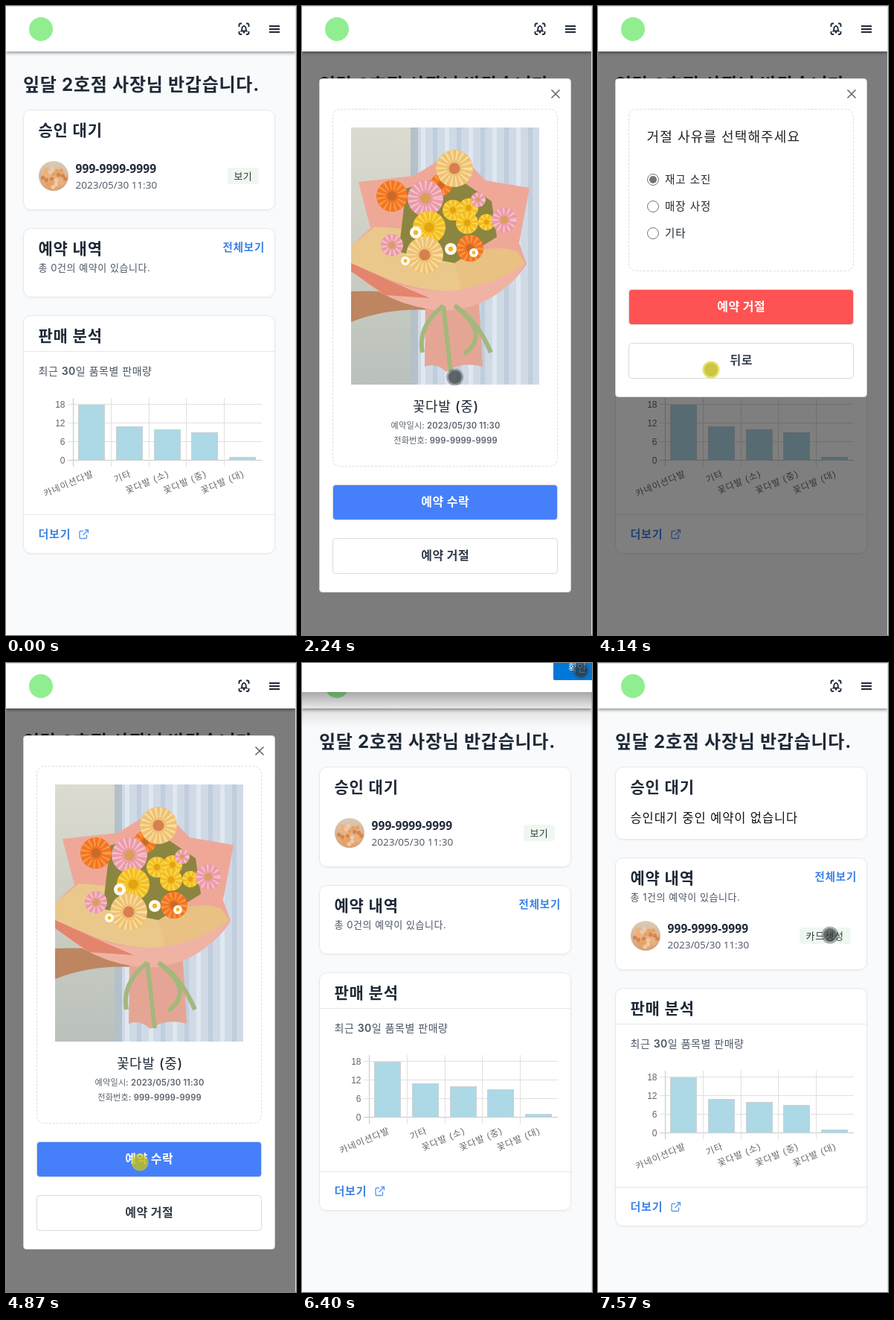
Animation of 390 by 844 pixels, one loop 8000 ms. Source, as an HTML page:

```html
<!DOCTYPE html>
<html lang="ko">
<head>
<meta charset="utf-8">
<style>
  html, body { margin: 0; width: 100%; height: 100%; overflow: hidden; background: #f9fafb; }
  svg { display: block; width: 390px; height: 844px; }
  text { font-family: Inter, 'Noto Sans CJK KR', 'Noto Sans KR', 'Noto Sans CJK JP', sans-serif; white-space: pre; }
  .open { font-family: 'Open Sans', 'Noto Sans CJK KR', sans-serif; }
  .axis { font-family: 'Liberation Sans', 'Noto Sans CJK KR', Arial, sans-serif; }
</style>
</head>
<body>
<svg id="stage" viewBox="0 0 390 844" xmlns="http://www.w3.org/2000/svg"></svg>
<script>
const LOOP = 8000;
const INK = '#1f2937', GRAY = '#4b5563', BLUE = '#3b82e8', EDGE = '#e5e7eb';
const PHONE = '999-9999-9999', DATE = '2023/05/30 11:30';

// ---- drawing helpers ----
const text = (s, x, y, size, { w = 400, fill = INK, ls = 0, more = '' } = {}) =>
  `<text x="${x}" y="${y}" font-size="${size}" font-weight="${w}" fill="${fill}" letter-spacing="${ls}" ${more}>${s}</text>`;
const rect = (x, y, w, h, fill, more = '') =>
  `<rect x="${x}" y="${y}" width="${w}" height="${h}" fill="${fill}" ${more}/>`;
const dot = (x, y, r, fill, more = '') => `<circle cx="${x}" cy="${y}" r="${r}" fill="${fill}" ${more}/>`;
const path = (d, stroke, w = 1, more = '') =>
  `<path d="${d}" fill="none" stroke="${stroke}" stroke-width="${w}" ${more}/>`;
const shape = (d, fill) => `<path d="${d}" fill="${fill}"/>`;
const group = (id, body, more = '') => `<g id="${id}" ${more}>${body}</g>`;

const card = (y, h) => rect(23.5, y + .5, 338, h - 1, '#fff', `rx="10" stroke="${EDGE}" filter="url(#soft)"`);
const heading = (s, y) => text(s, 43.5, y, 21, { w: 700, ls: .8 });
const link = (s, x, y, size) => text(s, x, y, size, { w: 600, fill: BLUE, ls: .8 });

// Round thumbnail filled with small blossoms on a spiral.
function avatar(y, id) {
  const tones = ['#f0b077', '#d98446', '#e9a05f', '#f3c9a0'];
  let s = dot(64, y, 20, 'url(#petal)');
  for (let i = 0; i < 22; i++) {
    const r = 3.5 * Math.sqrt(i), a = i * 2.4;
    s += dot((64 + r * Math.cos(a)).toFixed(1), (y + 2 + r * Math.sin(a) * .85).toFixed(1), 2.8, tones[i % 4]);
  }
  return group(id, s);
}

const booking = (y, label, x, id) => avatar(y, id) +
  text(PHONE, 93.5, y - 4, 15.5, { w: 700, ls: .1, more: 'class="open"' }) +
  text(DATE, 93.5, y + 17, 13.5, { fill: GRAY, more: 'class="open"' }) +
  rect(x, y - 11, 340 - x, 22, '#eff8f0', 'rx="4"') +
  text(label, x + 8.5, y + 4.5, 13, { fill: '#2f3b38', ls: label.length > 2 ? .9 : .3 });

const summary = (y, n) => heading('예약 내역', y + 35) + link('전체보기', 291.5, y + 31, 14.5) +
  text(`총 ${n}건의 예약이 있습니다.`, 43.5, y + 57.5, 13, { fill: GRAY, ls: .55 });

function chart() {
  const labels = ['카네이션다발', '기타', '꽃다발 (소)', '꽃다발 (중)', '꽃다발 (대)'];
  let s = '';
  for (let v = 0; v <= 18; v += 6) {
    const y = 609.5 - v * 25 / 6;
    s += path(`M83 ${y}H344`, v ? '#e0e0e0' : '#c8c8c8') +
      text(v, 79.5, y + 4, 12, { fill: '#666', more: 'class="axis" text-anchor="end"' });
  }
  [18, 11, 10, 9, 1].forEach((v, i) => {
    const x = 90.4 + i * 50.6, top = Math.round(609.5 - v * 25 / 6) + .5;
    s += path(`M${Math.round(x) + .5} 526V618`, i ? '#e0e0e0' : '#c8c8c8') +
      rect(Math.round(x + 7) + .5, top, 35, 609.5 - top, '#add8e6', 'stroke="#c9d2d5"') +
      text(labels[i], 0, 4, 12, {
        fill: '#666', ls: .9,
        more: `class="axis" text-anchor="end" transform="translate(${x + 26.8} 627) rotate(-23)"`
      });
  });
  return s;
}

const analysis = card(415, 320) + heading('판매 분석', 450) +
  path('M24 463.5H361M24 682.5H361', EDGE) +
  text('최근 <tspan font-weight="600">30</tspan>일 품목별 판매량', 43.5, 494.5, 14, { fill: GRAY, ls: .5 }) +
  chart() + link('더보기', 43.5, 713.5, 15) +
  path('M103.500 704.500H100.500Q99 704.500 99 706V713Q99 714.500 100.500 714.500H107Q108.500 714.500 108.500 713V710M106.500 703H110.500V707M110.500 703L104 709.500', '#5b9bf0', 1.4, 'stroke-linecap="round"');

const page = rect(0, 0, 390, 844, '#f9fafb') +
  text('잎달 2호점 사장님 반갑습니다.', 23, 114, 24, { w: 700, ls: .75 }) +
  group('before', card(139, 135) + heading('승인 대기', 174) + booking(228, '보기', 298, 'pic0') +
    card(298, 93) + summary(298, 0)) +
  group('after', card(139, 98) + heading('승인 대기', 174) +
    text('승인대기 중인 예약이 없습니다', 43.5, 214, 16.5, { ls: .9, fill: '#111' }) +
    card(261, 151) + summary(261, 1) + booking(366, '카드생성', 271, 'pic1')) +
  group('analysis', analysis);

const header = rect(0, 0, 390, 61, '#fff', 'filter="url(#drop)"') +
  dot(47, 31, 16, '#90ee90') +
  path('M313.500 28V25.500Q313.500 23.500 315.500 23.500H317M323 23.500H324.500Q326.500 23.500 326.500 25.500V28M326.500 34V36Q326.500 38 324.500 38H323M317 38H315.500Q313.500 38 313.500 36V34', INK, 1.9) +
  path('M316.500 33.500Q317.300 32.500 317.300 30.500Q317.300 27.800 320 26.500Q322.700 27.800 322.700 30.500Q322.700 32.500 323.500 33.500ZM318.800 35.500H321.200', INK, 1.8) +
  path('M354 27H368M354 31H368M354 35H368', INK, 2);

// ---- modals ----
const button = (y, s, fill, color) => rect(41.5, y + .5, 302, 47, fill, 'rx="4" stroke="#d6dade"') +
  text(s, 192.7, y + 28.5, 16, { w: 700, fill: color, ls: .4, more: 'text-anchor="middle"' });
const shell = h => rect(23.5, 97.5, 338, h - 1, '#fff', 'rx="4" stroke="#d0d3d6"') +
  path('M335.500 112.500L346.500 123.500M346.500 112.500L335.500 123.500', '#5b626c', 1.5);
const dashed = h => rect(41.5, 138.5, 302, h, 'none', 'rx="10" stroke="#dcdcdc" stroke-dasharray="3 2"');

// Flower with a ring of petals and a dark heart.
const bloom = (x, y, r, color, edge, heart) => dot(x, y, r, color) +
  dot(x, y, r * .7, 'none', `stroke="${edge}" stroke-width="${r * .55}" stroke-dasharray="2 4"`) +
  dot(x, y, r * .3, heart);

function bouquet() {
  let s = rect(66, 163, 80, 345, 'url(#wall)') + rect(146, 163, 173, 345, '#cfdae6') +
    rect(146, 163, 10, 345, '#b4c0ca');
  for (let x = 160; x < 319; x += 16) s += rect(x, 163, 6, 345, x % 32 ? '#c0cddc' : '#dfe8f1');
  s += shape('M66 383Q120 380 172 392V408Q115 405 66 424Z', '#bd8660') +
    shape('M166 395H238L243 484Q215 476 194 491Q180 478 165 484Z', '#e5a595') +
    shape('M76 236L150 228L207 193L247 234L306 244L292 318L302 346Q270 398 190 409Q110 402 66 352V322L92 298Z', '#efa898') +
    shape('M66 322L98 296L150 300L215 335L240 376Q190 392 120 368L66 345Z', '#eac88c') +
    shape('M205 345Q250 315 290 330L300 345Q265 375 215 384Z', '#e9c183') +
    shape('M66 345Q130 385 200 382Q260 375 300 345Q265 405 190 409Q110 402 66 352Z', '#f0b3a3') +
    shape('M66 345L130 374L172 392L112 388L66 356Z', '#e2856c') +
    shape('M140 245L200 225L255 262L262 310L205 345L130 330Z', '#8c8540') +
    path('M190 402Q155 430 162 465M190 402Q195 445 200 490M205 402Q255 440 218 467M205 402Q235 420 254 465', '#a5b77c', 6);
  const pink = ['#eb9ba8', '#f7c3cb', '#d9a05a'], gold = ['#f4bf22', '#f9d85a', '#e2a412'],
    cream = ['#efc272', '#f9dfa4', '#d77f52'], orange = ['#f37522', '#fb9a4a', '#c96a2c'];
  const blooms = [
    [187, 240, 15, orange], [205, 218, 25, cream], [121, 255, 21, orange], [166, 258, 24, pink],
    [203, 274, 14, gold], [224, 271, 13, gold], [237, 260, 10, pink], [171, 297, 22, gold],
    [222, 291, 15, gold], [248, 290, 11, gold], [226, 325, 18, orange], [272, 287, 17, pink],
    [121, 321, 15, pink], [165, 334, 25, cream]];
  s += blooms.map(([x, y, r, tones]) => bloom(x, y, r, ...tones)).join('');
  [[153, 304, 8], [139, 342, 6], [200, 326, 8], [231, 331, 6]].forEach(([x, y, r]) => {
    s += dot(x, y, r, '#fdfbf2') + dot(x, y, r * .4, '#f2b72c');
  });
  return s;
}

const info = (label, value, y) => text(`${label}: <tspan font-weight="600">${value}</tspan>`, 193, y, 11.2,
  { w: 500, fill: '#5b636e', ls: .15, more: 'text-anchor="middle"' });

const detail = shell(690) + dashed(479) + group('photo', bouquet(), 'clip-path="url(#frame)"') +
  text('꽃다발 <tspan font-weight="500">(중)</tspan>', 193.3, 544, 18, { ls: .6, more: 'text-anchor="middle"' }) +
  info('예약일시', DATE, 567) + info('전화번호', PHONE, 587) +
  button(642, '예약 수락', '#457ffa', '#fff') + button(714, '예약 거절', '#fff', '#2f3947');

const reason = shell(428) + dashed(217) +
  text('거절 사유를 선택해주세요', 65.5, 182, 18, { ls: 1.1, fill: '#222' }) +
  ['재고 소진', '매장 사정', '기타'].map((s, i) => {
    const y = 233 + i * 36;
    return dot(74, y, 7.5, '#fff', 'stroke="#767676"') + (i ? '' : dot(74, y, 5, '#757575')) +
      text(s, 90, y + 5, 14.5, { ls: 1 });
  }).join('') +
  button(380, '예약 거절', '#ff5252', '#fff') + button(452, '뒤로', '#fff', '#374151');

const alertBox = rect(0, 42, 390, 48, 'url(#shade)') + rect(0, -60, 390, 102, '#fff') +
  rect(338, -10, 60, 36, '#0078d7', 'rx="2"') + text('확인', 358, 13.5, 13, { fill: '#fff' });

const stop = (at, color, a = 1) => `<stop offset="${at}" stop-color="${color}" stop-opacity="${a}"/>`;
const defs = `<defs>
  <filter id="soft" x="-5%" y="-5%" width="110%" height="112%"><feDropShadow dx="0" dy="1" stdDeviation="1" flood-opacity=".05"/></filter>
  <filter id="drop" x="-5%" y="-20%" width="110%" height="150%"><feDropShadow dx="0" dy="2" stdDeviation="2" flood-opacity=".42"/></filter>
  <linearGradient id="shade" x2="0" y2="1">${stop(0, '#000', .34)}${stop(.4, '#000', .12)}${stop(1, '#000', 0)}</linearGradient>
  <linearGradient id="wall" x2="0" y2="1">${stop(0, '#dcdbcf')}${stop(1, '#bac1bb')}</linearGradient>
  <linearGradient id="petal" x2="0" y2="1">${stop(0, '#d9ccba')}${stop(1, '#d9a074')}</linearGradient>
  <clipPath id="frame">${rect(66, 163, 253, 345, '#000')}</clipPath>
</defs>`;

const $ = id => document.getElementById(id);
$('stage').innerHTML = defs + page +
  group('veil', rect(0, 61, 389, 783, '#000', 'opacity=".5"')) +
  group('detail', detail) + group('reason', reason) +
  group('tap', rect(41, 0, 303, 48, '#33b5e5', 'rx="4" opacity=".4"')) +
  header + path('M0 .5H390M389.500 0V844', '#dedede') +
  group('alert', alertBox) +
  group('cursor', dot(0, 0, 11.5, '#000', 'id="halo"') + dot(0, 0, 9, '#000', 'id="core"'));

// ---- timeline ----
// Cursor moves: start, end, number of steps, evenly timed points.
const moves = [
  [290, 1030, 14, [[0, 735], [170, 818], [365, 825], [372, 500], [350, 215], [312, 226]]],
  [1890, 2670, 17, [[312, 226], [262, 330], [200, 520], [177, 690], [196, 731]]],
  [3290, 3720, 10, [[196, 731], [178, 640], [150, 540], [152, 488]]],
  [4240, 4540, 7, [[152, 488], [160, 580], [180, 670]]],
  [5500, 6300, 16, [[180, 670], [203, 348], [262, 150], [335, 45], [375, 10]]],
  [7170, 7570, 9, [[375, 10], [325, 105], [322, 287], [312, 365]]]
];
const presses = [[1460, 1560], [2810, 2860], [4140, 4190], [4870, 4970], [6350, 6400]];
// Dialog slide: time, offset, opacity.
const slide = [[0, 0, 0], [4970, -18, .3], [5020, -9, .65], [5070, -4, .9], [5120, -1, 1], [5170, 0, 1],
  [6400, -3, 1], [6450, -10, .65], [6500, -18, .25], [6550, 0, 0]];

const clamp = (v, a, b) => Math.min(b, Math.max(a, v));
const within = (t, a, b) => t >= a && t < b;
const show = (id, on) => { $(id).style.display = on ? '' : 'none'; };

// Catmull-Rom curve through the points, u from 0 to 1.
function along(pts, u) {
  const n = pts.length - 1, i = Math.min(n - 1, Math.floor(u * n)), f = u * n - i;
  const at = k => pts[clamp(k, 0, n)];
  return [0, 1].map(c => {
    const [a, b, d, e] = [at(i - 1)[c], at(i)[c], at(i + 1)[c], at(i + 2)[c]];
    return b + f / 2 * (d - a + f * (2 * a - 5 * b + 4 * d - e + f * (3 * (b - d) + e - a)));
  });
}

function cursorAt(t) {
  const move = moves.filter(m => t >= m[0]).pop();
  if (!move) return null;
  const [start, end, steps, pts] = move;
  const k = Math.floor((t - start) / (end - start) * (steps - 1) + .25) + 1;
  return along(pts, clamp(k / steps, 0, 1));
}

function draw(t) {
  const done = t >= 6600;
  show('before', !done);
  show('after', done);
  show('pic1', t >= 6740);
  $('analysis').setAttribute('transform', `translate(0 ${done ? 21 : 0})`);

  show('veil', within(t, 1600, 6400));
  show('detail', within(t, 1600, 2860) || within(t, 4190, 6400));
  show('reason', within(t, 2860, 4190));

  const first = within(t, 2860, 3000), second = within(t, 4190, 4330);
  show('tap', first || second);
  $('tap').setAttribute('transform', `translate(0 ${first ? 452 : 714})`);
  $('tap').setAttribute('opacity', within(t, 2950, 3000) || t >= 4280 ? .5 : 1);

  const [, dy, alpha] = slide.filter(s => t >= s[0]).pop();
  $('alert').setAttribute('transform', `translate(0 ${dy})`);
  $('alert').setAttribute('opacity', alpha);

  const p = cursorAt(t);
  show('cursor', p);
  if (!p) return;
  const down = presses.some(([a, b]) => within(t, a, b));
  $('cursor').setAttribute('transform', `translate(${p[0].toFixed(1)} ${p[1].toFixed(1)})`);
  $('halo').setAttribute('fill', down ? 'rgba(214,209,20,.65)' : 'rgba(70,74,76,.42)');
  $('core').setAttribute('fill', down ? 'rgba(180,176,40,.55)' : 'rgba(38,42,44,.5)');
}

const origin = performance.now();
function tick() {
  draw((performance.now() - origin) % LOOP);
  requestAnimationFrame(tick);
}
tick();
</script>
</body>
</html>
```
